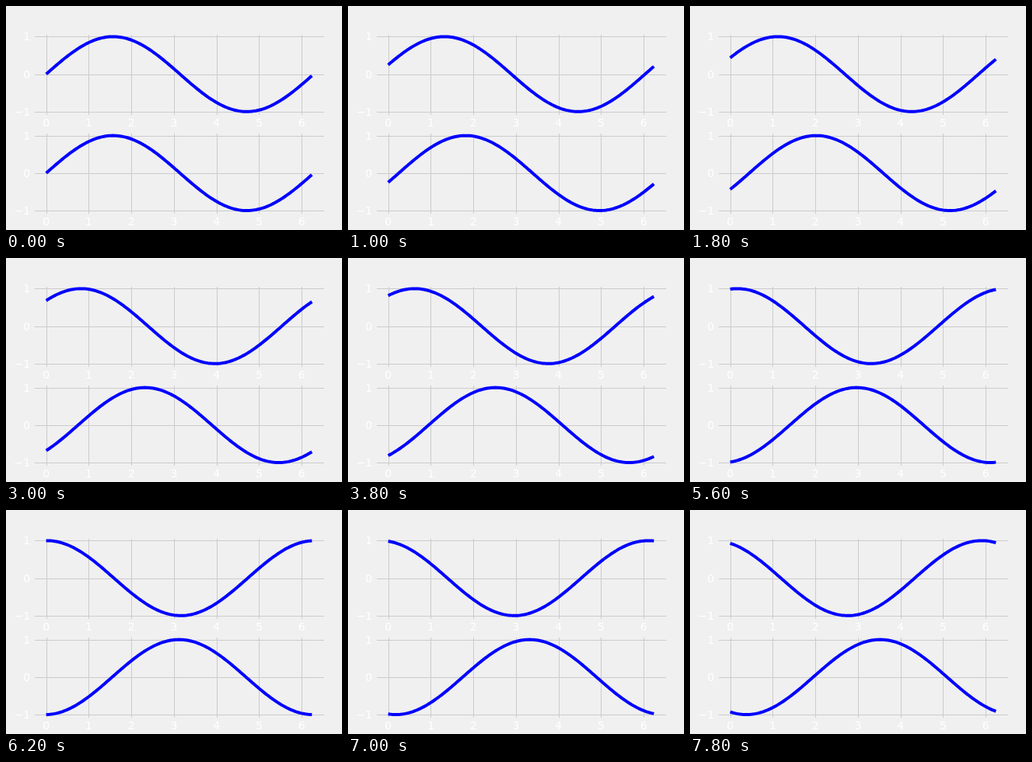
Write an HTML page with a canvas that moves like this. It is 432 by 288 pixels and loops after 8000 ms.

```html
<!DOCTYPE html>
<html lang="en">
<head>
<meta charset="utf-8">
<title>Phase-shifted sine waves</title>
<style>
  html, body { margin: 0; width: 100%; height: 100%; overflow: hidden; background: #f0f0f0; }
  canvas { display: block; }
</style>
</head>
<body>
<canvas id="stage" width="432" height="288"></canvas>
<script>
const ctx = document.getElementById('stage').getContext('2d');

const STEP_MS = 200, STEPS = 40, PHASE_STEP = 0.05;
const X_END = 6.24, X_STEP = 0.04;
const LEFT = 34.56, RIGHT = 410.4, HEIGHT = 106.04;
const PAD = 3.5, MARGIN = (RIGHT - LEFT) / 22;
const X_SCALE = (RIGHT - LEFT - 2 * MARGIN) / X_END;
const Y_SCALE = HEIGHT / 2.2;

// Each plot's wave travels in its own direction.
const plots = [
  { top: 34.56, direction: 1 },
  { top: 161.8, direction: -1 }
];

const toX = x => LEFT + MARGIN + x * X_SCALE;
const toY = (plot, y) => plot.top + HEIGHT / 2 - y * Y_SCALE;
const snap = v => Math.round(v);

function drawAxes(plot) {
  const x0 = snap(LEFT) + 2, x1 = snap(RIGHT) - 1;
  const y0 = snap(plot.top) + 2, y1 = snap(plot.top + HEIGHT) - 1;
  ctx.font = '14px "DejaVu Sans", sans-serif';
  ctx.textBaseline = 'alphabetic';

  for (let x = 0; x <= 6; x++) {
    ctx.fillStyle = '#cbcbcb';
    ctx.fillRect(snap(toX(x)), y0, 1, y1 - y0);
    ctx.fillStyle = '#fff';
    ctx.textAlign = 'center';
    ctx.fillText(x, toX(x), snap(plot.top + HEIGHT + PAD + 10.4));
  }
  for (let y = -1; y <= 1; y++) {
    ctx.fillStyle = '#cbcbcb';
    ctx.fillRect(x0, snap(toY(plot, y)), x1 - x0, 1);
    ctx.fillStyle = '#fff';
    ctx.textAlign = 'right';
    ctx.fillText(String(y).replace('-', '\u2212'), LEFT - PAD, snap(toY(plot, y) + 5.1));
  }
}

function drawWave(plot, phase) {
  ctx.beginPath();
  for (let i = 0; i <= Math.round(X_END / X_STEP); i++) {
    const x = i * X_STEP;
    ctx.lineTo(toX(x), toY(plot, Math.sin(x + plot.direction * phase)));
  }
  ctx.strokeStyle = '#00f';
  ctx.lineWidth = 4;
  ctx.lineJoin = 'round';
  ctx.stroke();
}

function render() {
  const step = Math.floor(performance.now() / STEP_MS) % STEPS;
  ctx.fillStyle = '#f0f0f0';
  ctx.fillRect(0, 0, 432, 288);
  for (const plot of plots) {
    drawAxes(plot);
    drawWave(plot, step * PHASE_STEP);
  }
  requestAnimationFrame(render);
}
render();
</script>
</body>
</html>
```
